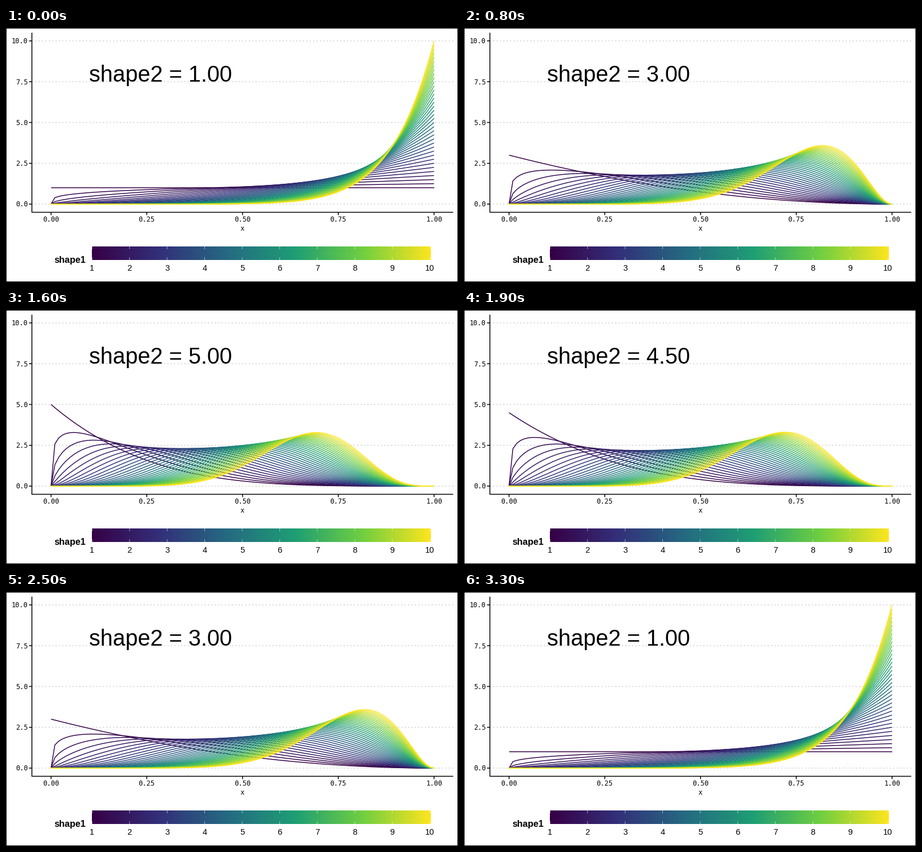
A matplotlib script that plays this animation: 800 px wide and 450 px high, repeating every 3400 ms.

```python
import math

import numpy as np
import matplotlib.pyplot as plt
from matplotlib.animation import FuncAnimation
from matplotlib.collections import LineCollection
from matplotlib.colors import LinearSegmentedColormap

W, H, DPI = 800, 450, 100
PX = 72 / DPI
FRAMES, INTERVAL = 34, 100

X0, X1 = 79.7, 757.6          # pixels of x = 0 and x = 1
Y0, Y10 = 312.0, 22.8         # pixels of y = 0 and y = 10
LEFT, RIGHT, TOP, BOTTOM = 45.8, 791.5, 8.3, 326.5
BAR = (151.6, 750.9, 411.0, 387.0)
LINE = 1.5

viridis = LinearSegmentedColormap.from_list(
    "shape1", ["#360046", "#33307a", "#256a82", "#1e9e74", "#70cf40", "#fde51e"], 512)

x = np.linspace(0, 1, 101)
shapes = np.arange(1, 10.01, 0.25)


def to_px(u):
    return X0 + (X1 - X0) * u


def to_py(v):
    return Y0 + (Y10 - Y0) * v / 10


def beta_pdf(a, b):
    norm = math.gamma(a + b) / (math.gamma(a) * math.gamma(b))
    return norm * x ** (a - 1) * (1 - x) ** (b - 1)


def curves(b):
    return [np.column_stack([to_px(x), to_py(beta_pdf(a, b))]) for a in shapes]


fig = plt.figure(figsize=(W / DPI, H / DPI), dpi=DPI, facecolor="white")
ax = fig.add_axes([0, 0, 1, 1])
ax.axis("off")


def line(xs, ys, color="black", width=LINE, **kw):
    ax.plot(xs, ys, color=color, lw=width * PX, solid_capstyle="butt",
            dash_capstyle="butt", snap=False, **kw)


def label(px, py, s, size, ha="center", family="Liberation Sans", **kw):
    return ax.text(px, py, s, fontsize=size * PX, family=family, ha=ha,
                   va="baseline", color="black", **kw)


def mono(px, py, s, **kw):
    label(px, py, s, 12, family="DejaVu Sans Mono", **kw)


# Axes and grid
for v in (0, 2.5, 5, 7.5, 10):
    y = to_py(v)
    line([LEFT, RIGHT], [y, y], "#bebebe", linestyle=(0, (1, 3)))
    line([LEFT - 5, LEFT], [y, y])
    mono(39, y + 4.5, f"{v:.1f}", ha="right")
for u in (0, 0.25, 0.5, 0.75, 1):
    line([to_px(u)] * 2, [BOTTOM, BOTTOM + 5])
    mono(to_px(u), 343, f"{u:.2f}")
line([LEFT, LEFT, RIGHT], [TOP, BOTTOM, BOTTOM])
mono(to_px(0.5), 359, "x")

# Colour bar
ax.imshow(np.linspace(0, 1, 600)[None, :], cmap=viridis, extent=BAR,
          aspect="auto", interpolation="bilinear")
left, right, low, high = BAR
for n in range(1, 11):
    px = left + 0.7 + (right - left - 1.4) * (n - 1) / 9
    for y in ([high, high + 4.8], [low - 4.8, low]):
        line([px, px], y, "white", 0.8, alpha=0.7)
    label(px, 430.5, str(n), 14.6)
label(85.5, 416, "shape1", 16.2, ha="left", weight="bold")

# Frame around the stage
line([0.5, W - 0.5, W - 0.5, 0.5, 0.5], [0.5, 0.5, H - 0.5, H - 0.5, 0.5], width=1)

bundle = LineCollection(curves(1), colors=viridis((shapes - 1) / 9),
                        linewidths=LINE * PX, capstyle="butt", zorder=3)
ax.add_collection(bundle)
title = label(146.7, 95, "", 39.8, ha="left", zorder=4)

ax.set_xlim(0, W)
ax.set_ylim(H, 0)


def update(i):
    b = 1 + 0.25 * min(i, FRAMES - 1 - i)
    bundle.set_segments(curves(b))
    title.set_text(f"shape2 = {b:.2f}")
    return bundle, title


anim = FuncAnimation(fig, update, frames=FRAMES, interval=INTERVAL, repeat=True)
plt.show()
```
